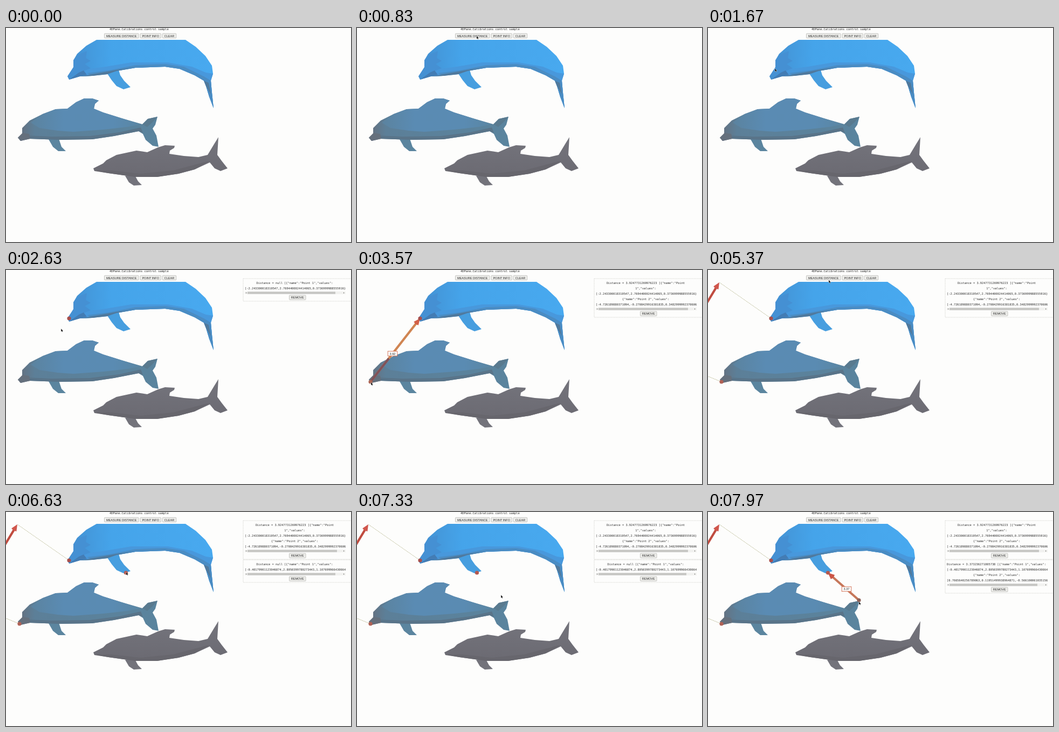
Animation, 640 px wide and 398 px high, one loop 8000 ms. Source, as an HTML page:

```html
<!DOCTYPE html>
<html lang="en">
<head>
<meta charset="utf-8">
<title>Measuring tool</title>
<style>
html, body { margin: 0; width: 100%; height: 100%; overflow: hidden; background: #fdfdfc; }
svg { display: block; width: 100vw; height: 100vh; }
.mono { font: 5.375px "DejaVu Sans Mono", monospace; fill: #2b2b2b; white-space: pre; }
.ui { font: 5.55px "Liberation Sans", Arial, sans-serif; fill: #222; text-anchor: middle; }
.mid { text-anchor: middle; }
.btn { fill: #efefec; stroke: #b9b9b5; stroke-width: .8; }
.panel { fill: none; stroke: #c6c6c2; stroke-width: .7; stroke-dasharray: 1.5 1; }
.lead { stroke: #b5b58c; stroke-width: .9; stroke-dasharray: 2 1; }
.tag { fill: #fdfdfc; stroke: #d16a4c; stroke-width: .9; }
</style>
</head>
<body>
<svg viewBox="0 0 640 398" preserveAspectRatio="none">
  <defs>
    <linearGradient id="sea" x1="0" x2="1"><stop offset="0" stop-color="#438fd0"/><stop offset=".3" stop-color="#45a4ea"/><stop offset="1" stop-color="#48a9ef"/></linearGradient>
    <linearGradient id="steel" x1="0" x2="1"><stop offset="0" stop-color="#666f7c"/><stop offset=".12" stop-color="#5c7f98"/><stop offset="1" stop-color="#5a849e"/></linearGradient>
    <linearGradient id="slate" x1="0" x2="1"><stop offset="0" stop-color="#5b839f"/><stop offset=".3" stop-color="#5a8bb3"/><stop offset=".75" stop-color="#5a8bb2"/><stop offset="1" stop-color="#5a86a3"/></linearGradient>
    <linearGradient id="stone" x2="0" y2="1"><stop offset="0" stop-color="#74747c"/><stop offset="1" stop-color="#6b6a72"/></linearGradient>
    <clipPath id="textBox"><rect x="443" width="187" height="398"/></clipPath>
  </defs>

  <g id="upper">
    <path fill="#479edf" d="M188 85L196 97 205 108 218 114 231 110 219 98 212 88 209 78Z"/>
    <path fill="url(#sea)" d="M114 90L125 73 125 60 132 48 149 33 168 22H333L352 35 370 52 382 70 384 85 380 98 382 120 385 149 377 128 371 108 367 98 350 88 322 76 295 72 240 74 205 80 188 86 160 89 137 90 117 96Z"/>
    <path fill="#4898dc" d="M140 78L185 72 232 64 300 64 345 72 371 83 384 85 380 98 382 120 385 149 377 128 371 108 367 98 350 88 322 76 295 72 240 74 205 80 160 89 137 90Z"/>
    <path fill="#4a8cc3" d="M150 84L190 79 240 69 295 67 330 72 367 90 380 98 382 120 385 149 377 128 371 108 367 98 350 88 322 76 295 72 240 74 205 80 160 89Z"/>
    <path fill="#4590d3" d="M125 60L134 49 150 43 148 56 157 61 146 67 157 75 139 82 114 90 125 73Z"/>
    <path fill="#437cb4" d="M117 96L137 90 150 87 144 79 135 83Z"/>
    <path fill="#50799c" d="M137 90L160 86 205 78 240 73 205 80 188 86 160 89ZM367 98L376 102 380 123 371 108Z"/>
  </g>

  <g id="middle">
    <path fill="#5b859f" d="M79 207L87 221 97 229H111L103 221 98 206Z"/>
    <path fill="url(#steel)" d="M22 204L30 196 30 186 44 172 68 160 92 151 114 150 130 138 145 131 160 131 172 135 165 141 163 150 180 157 215 168 253 179 263 169 281 165 277 180 272 187 279 200 283 221 272 219 259 208 254 197 246 192 200 201 160 207 98 208 44 206 27 210Z"/>
    <path fill="url(#slate)" d="M46 176L68 160 92 151 114 150 130 138 145 131 160 131 172 135 165 141 163 150 180 157 215 168 250 179 225 184 180 189 125 193 96 191 62 186Z"/>
    <path fill="#597489" d="M40 200L85 202 155 201 210 194 250 185 254 195 246 192 200 201 160 207 98 208 44 206Z"/>
    <path fill="#65707d" d="M22 204L31 195 43 197 45 206 27 210Z"/>
    <path fill="#597a8f" d="M253 179L263 169 281 165 272 175 262 184Z"/>
  </g>

  <g id="lower">
    <path fill="#73737b" d="M221 275L228 287 237 293 252 292 245 285 239 274Z"/>
    <path fill="url(#stone)" d="M162 261L180 252 186 246 205 236 242 228 262 231 282 222 295 218 313 219 312 223 304 228 303 234 330 238 357 240 374 236 386 216 394 203 392 236 400 247 411 261 398 266 387 261 378 250 350 263 320 271 280 277 240 277 190 270 164 266Z"/>
    <path fill="#67666d" d="M163 265L195 265 250 271 310 265 378 247 350 263 320 271 280 277 240 277 190 270Z"/>
  </g>

  <text class="mono" x="192" y="4.3">4DPane.Calibrations control sample</text>
  <g id="toolbar"></g>
  <g id="panels"></g>
  <g id="marks"></g>
  <path id="cursor" d="M0 0V5.2L1.3 4.1 2.2 6 3 5.6 2.2 3.8H3.8Z" fill="#1b1b1b" stroke="#fff" stroke-width=".7" paint-order="stroke"/>
</svg>
<script>
const LOOP = 8000;
const CLICK = { a1: 1900, a2: 3450, drop: 5060, b1: 6050, b2: 7650 };
const $ = id => document.getElementById(id);
const esc = s => s.replace(/"/g, "&quot;");

// Rows: time, x, y
const pointer = [
  [300, 225, -9], [800, 222, 15], [1000, 222, 15], [1650, 125, 74], [1850, 117, 90],
  [2500, 117, 90], [3300, 26, 209], [3720, 26, 209], [4100, 117, 90], [4180, 117, 90],
  [4500, 36, 32], [4750, 21, 23], [5060, 21, 23], [5340, 224, 19], [5500, 224, 17],
  [5960, 223, 112], [6750, 223, 112], [7500, 280, 167]
];
const dragTip = [[4180, 117, 90], [4500, 37, 31], [4750, 21, 23]];

function along(path, t) {
  if (t <= path[0][0]) return path[0].slice(1);
  for (let i = 1; i < path.length; i++) {
    const [t0, x0, y0] = path[i - 1], [t1, x1, y1] = path[i];
    if (t < t1) {
      const k = (t - t0) / (t1 - t0);
      return [x0 + (x1 - x0) * k, y0 + (y1 - y0) * k];
    }
  }
  return path[path.length - 1].slice(1);
}

const button = (x, y, w, label, h = 8.4) =>
  `<rect class="btn" x="${x}" y="${y}" width="${w}" height="${h}" rx=".8"/>
   <text class="ui" x="${x + w / 2}" y="${y + h / 2 + 2}">${label}</text>`;

function panel(y, lines, thumbEnd) {
  const end = y + 10 * lines.length;
  const rows = lines.map((s, i) => {
    const wide = s.length > 56;
    return `<text class="mono ${wide ? "" : "mid"}" x="${wide ? 443 : 535.5}" y="${y + 10 + 10 * i}">${esc(s)}</text>`;
  }).join("");
  return `<rect class="panel" x="440" y="${y}" width="201" height="${end + 22 - y}"/>
    <g clip-path="url(#textBox)">${rows}</g>
    <rect x="443" y="${end + 4}" width="187" height="5" fill="#f2f2f0"/>
    <rect x="448" y="${end + 4.4}" width="${thumbEnd - 448}" height="4.2" fill="#c6c6c3"/>
    <path fill="#6c6c6a" d="M446.2 ${end + 5.2}v2.6l-1.7-1.3ZM626 ${end + 5.2}v2.6l1.7-1.3Z"/>
    ${button(525.5, end + 11, 30.5, "REMOVE")}`;
}

const name = n => `{"name":"Point ${n}","values":`;
const a1 = "[-2.243300018310547,2.7694400024414065,0.3736999988555916}";
const a2 = "[-4.726189880371094,-0.2708429916381835,0.3482999992370606";
const b1 = "[-0.40179901123046874,2.8050399780273443,1.107699966430664";
const b2 = "[0.7665640256789063,0.11951499938964871,-0.566100061035156";
const panels = [
  [CLICK.a1, CLICK.a2, panel(16, ["Distance = null [" + name(1), a1], 611)],
  [CLICK.a2, LOOP, panel(16, ['Distance = 3.9247731269976223 [{"name":"Point', '1","values":', a1, name(2), a2], 614)],
  [CLICK.b1, CLICK.b2, panel(89, ["Distance = null [" + name(1), b1], 611)],
  [CLICK.b2, LOOP, panel(89, ["Distance = 3.373236271805738 [" + name(1), b1, name(2), b2], 611)]
];

$("toolbar").innerHTML = button(182.5, 10.3, 63.5, "MEASURE DISTANCE") +
  button(249, 10.3, 38.5, "POINT INFO") + button(290.3, 10.3, 25.4, "CLEAR");
$("panels").innerHTML = panels.map(p => `<g>${p[2]}</g>`).join("");
const panelNodes = [...$("panels").children];

const ball = ([x, y], color = "#a84f4c") => `<circle cx="${x}" cy="${y}" r="3.6" fill="${color}"/>`;
const line = ([x, y], [u, v], attrs) => `<line x1="${x}" y1="${y}" x2="${u}" y2="${v}" ${attrs}/>`;
const lead = (p, q) => line(p, q, 'class="lead"');
const tag = (x, y, s) =>
  `<rect class="tag" x="${x - 8.8}" y="${y - 4.4}" width="17.6" height="8.8"/>
   <text class="ui" x="${x}" y="${y + 2}">${s}</text>`;

function arrow(tip, tail, color, head) {
  const dx = tail[0] - tip[0], dy = tail[1] - tip[1], len = Math.hypot(dx, dy);
  const ux = dx / len, uy = dy / len;
  const at = (d, side) => [tip[0] + ux * d - uy * side, tip[1] + uy * d + ux * side];
  return line(at(9, 0), tail, `stroke="${color}" stroke-width="4.2"`) +
    `<path d="M${tip}L${at(12, 5.4)} ${at(13.5, 0)} ${at(12, -5.4)}Z" fill="${head}"/>`;
}

function firstMeasure(t) {
  const start = [117, 90], end = [25, 208];
  if (t < CLICK.a1) return "";
  if (t < CLICK.a2) return ball(start);
  const tip = along(dragTip, t), u = (117 - tip[0]) / 96;
  const tail = [25 - 93 * u, 208 - 38 * u];
  const held = t >= 4180 && t < CLICK.drop;
  const color = held ? "#2c2a20" : u ? "#c04c40" : "#d08552";
  return (u ? lead(start, tip) + lead(end, tail) : "") +
    arrow(tip, tail, color, u ? "#d0564c" : "#d26048") +
    (u ? "" : line([59, 164.5], end, 'stroke="#80525a" stroke-width="4.2"')) +
    ball(start) + ball(end, u ? "#b16155" : "#ad6655") + tag(66 - 89 * u, 155.5 - 60 * u, "3.92");
}

function secondMeasure(t) {
  const start = [222.5, 113], end = [280, 164];
  if (t < CLICK.b1) return "";
  if (t < CLICK.b2) return ball(start, "#b4584e");
  return arrow(start, end, "#c6775a", "#cc5546") + ball(start, "#b4584e") +
    ball(end, "#8e6258") + tag(257, 143.3, "3.37");
}

function draw(now) {
  const t = now % LOOP;
  panels.forEach(([from, to], i) => {
    panelNodes[i].style.display = t >= from && t < to ? "" : "none";
  });
  $("marks").innerHTML = firstMeasure(t) + secondMeasure(t);
  $("cursor").setAttribute("transform", `translate(${along(pointer, t)})`);
}

let origin;
function tick(now) {
  origin ??= now;
  draw(now - origin);
  requestAnimationFrame(tick);
}
draw(0);
requestAnimationFrame(tick);
</script>
</body>
</html>
```
